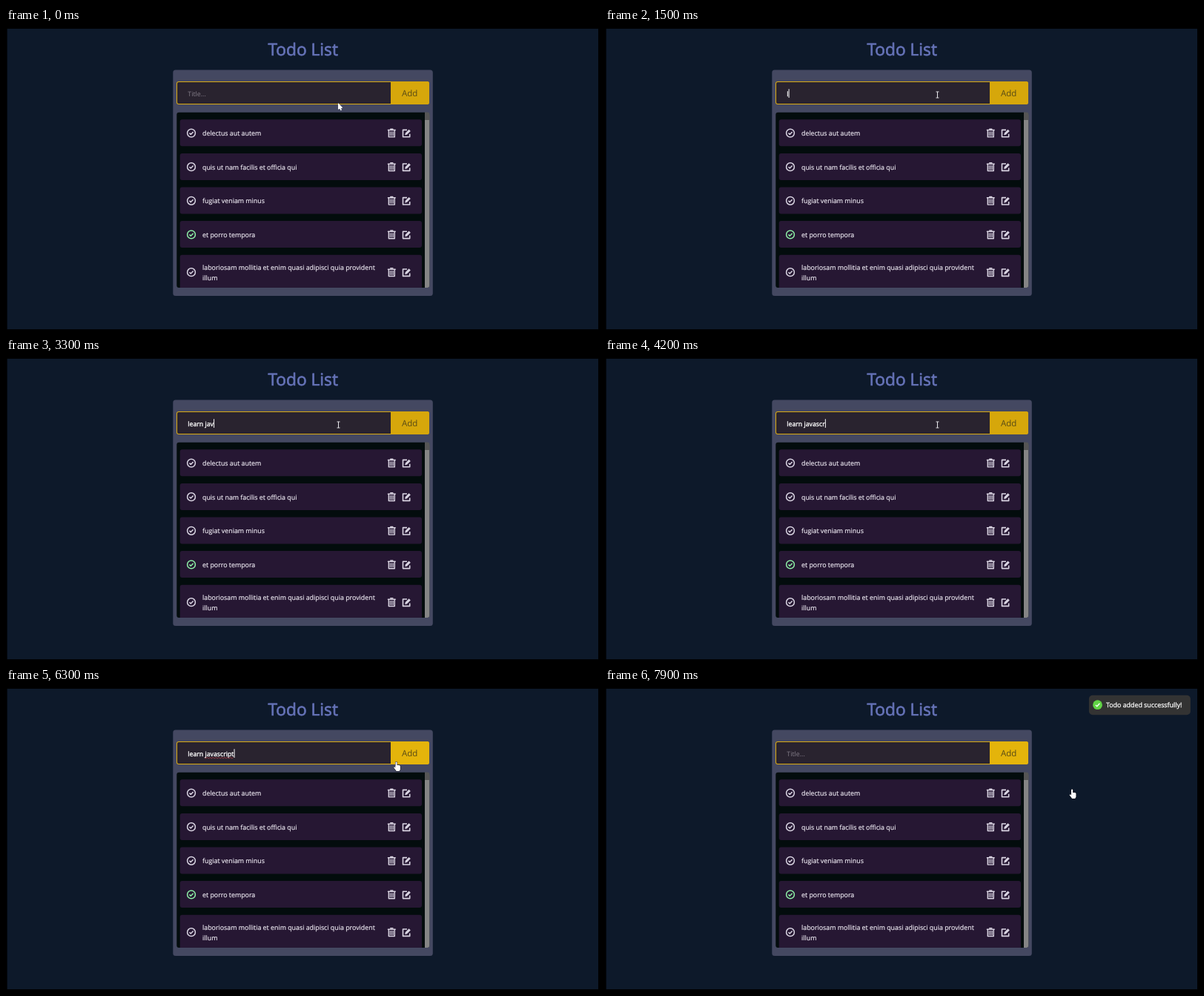
Animation, 800 px wide and 407 px high, one loop 8 s. Source, as an HTML page with a canvas:

```html
<!DOCTYPE html>
<html lang="en">
<head>
<meta charset="utf-8">
<title>Todo List</title>
<style>
html, body { margin: 0; width: 100%; height: 100%; overflow: hidden; background: #0d192a; }
canvas { display: block; width: 800px; height: 407px; }
</style>
</head>
<body>
<canvas id="stage" width="800" height="407"></canvas>
<script>
const ctx = document.getElementById('stage').getContext('2d');
const LOOP = 8000, STEP = 100;
const FONT = '"Open Sans", "Noto Sans", sans-serif';
const ICON = '#d9d4e2', WHITE = '#fafafa', BODY = 8.86;
const TYPED = 'learn javascript', TEXT_X = 245.3, TEXT_Y = 91.6;
const FOCUS = 900, FIRST_KEY = 1360, KEY_GAP = 225, BLINK = 530;
const SPELL = 5300, HOVER = 6200, CLICK = 6800, CLEAR = 7000, TOAST = 7068;
const ITEMS = [
  'delectus aut autem',
  'quis ut nam facilis et officia qui',
  'fugiat veniam minus',
  'et porro tempora',
  'laboriosam mollitia et enim quasi adipisci quia provident\nillum'
];
const DONE = 3;
const MOVES = [
  { from: 200, to: 600, dx: 0.5, dy: -11 },
  { from: 5500, to: 6200, dx: 78, dy: 9.5 },
  { from: 6300, to: 6700, dx: 8.5, dy: -6 },
  { from: 7300, to: 7900, dx: 95, dy: 43 }
];

const clamp = v => Math.max(0, Math.min(1, v));
const smooth = v => v * v * (3 - 2 * v);
const easeOut = (v, power) => 1 - (1 - clamp(v)) ** power;
const backOut = v => 1 + 2.7 * (v - 1) ** 3 + 1.7 * (v - 1) ** 2;

function box(x, y, w, h, color, r = 0) {
  ctx.fillStyle = color;
  ctx.beginPath();
  ctx.roundRect(x, y, w, h, r);
  ctx.fill();
}

// weight is the width of an outline that thickens the letters
function text(str, x, y, size, color, weight = 0.2) {
  ctx.font = `${size}px ${FONT}`;
  ctx.fillStyle = ctx.strokeStyle = color;
  ctx.fillText(str, x, y);
  if (weight) {
    ctx.lineWidth = weight;
    ctx.strokeText(str, x, y);
  }
  return ctx.measureText(str).width;
}

function line(points, color, width) {
  ctx.strokeStyle = color;
  ctx.lineWidth = width;
  ctx.beginPath();
  points.forEach(([x, y]) => ctx.lineTo(x, y));
  ctx.stroke();
}

function ring(r, color, width, from = 0, to = 2 * Math.PI) {
  ctx.strokeStyle = color;
  ctx.lineWidth = width;
  ctx.beginPath();
  ctx.arc(0, 0, r, from, to);
  ctx.stroke();
}

function placed(x, y, draw) {
  ctx.save();
  ctx.translate(x, y);
  draw();
  ctx.restore();
}

function checkIcon(color) {
  ring(5.4, color, 1.5);
  line([[-2.5, 0], [-0.7, 1.8], [2.6, -1.6]], color, 1.5);
}

function trashIcon() {
  box(-5.5, -4.8, 11, 1.5, ICON, 0.5);
  box(-2.2, -6.1, 4.4, 1.5, ICON, 0.6);
  line([[-4, -4], [-4, 5.3], [4, 5.3], [4, -4]], ICON, 1.4);
  for (let x = -2; x <= 2; x += 2) box(x - 0.55, -2.2, 1.1, 6, ICON);
}

function editIcon() {
  line([[0.5, -4.2], [-5, -4.2], [-5, 5.2], [4.2, 5.2], [4.2, 1.2]], ICON, 1.6);
  line([[-1, 1.4], [4.2, -3.8]], ICON, 3.1);
  line([[-2, 2.4], [-0.5, 0.9]], ICON, 1.6);
}

function drawItem(item, i) {
  const y = 123.3 + 45.6 * i;
  const lines = item.split('\n'), extra = lines.length - 1;
  const mid = y + 18.3 + extra * 5.2;
  box(234.7, y, 326.3, 36 + extra * 14, '#261733', 3);
  placed(250, mid, () => checkIcon(i === DONE ? '#8df0a6' : ICON));
  placed(520.3, mid, trashIcon);
  placed(540.5, mid, editIcon);
  lines.forEach((s, n) => text(s, 265, mid + 3.4 + (n - extra / 2) * 14.2, BODY, '#eae6ef'));
}

function drawInput(t) {
  box(230, 72, 341, 31, '#d9aa12', 3);
  box(231, 73, 288, 29, '#29232f', [2, 0, 0, 2]);
  box(519, 72, 52, 31, t >= HOVER ? '#e4b40b' : '#d6a70b', [0, 3, 3, 0]);
  text('Add', 534, 92.3, 11.5, '#574a16', 0);

  const keys = Math.floor((t - FIRST_KEY) / KEY_GAP) + 1;
  const count = t < CLEAR ? Math.max(0, Math.min(TYPED.length, keys)) : 0;
  if (!count) text('Title...', TEXT_X, TEXT_Y, BODY, '#837d88', 0);
  const end = TEXT_X + text(TYPED.slice(0, count), TEXT_X, TEXT_Y, 8.75, WHITE, 0.35);
  if (t >= SPELL && t < CLEAR) {
    const start = TEXT_X + ctx.measureText('learn ').width, wave = [];
    for (let x = start; x <= end; x++) wave.push([x, 94.2 + 0.6 * Math.sin((x - start) * 1.6)]);
    line(wave, '#c4444c', 0.8);
  }
  if (t >= FOCUS && t < CLICK) {
    const last = count ? FIRST_KEY + (count - 1) * KEY_GAP : FOCUS;
    if ((t - last) % (2 * BLINK) < BLINK) box(end + 0.1, 82.3, 1, 11.6, WHITE);
  }
}

function drawPage(t) {
  box(0, 0, 800, 407, '#000');
  box(1.6, 1, 797.4, 405, '#0d192a');
  text('Todo List', 353.4, 37.2, 22.7, '#6673b8', 0.7);
  box(225.3, 56.4, 350.5, 304.6, '#444861', 3.5);
  drawInput(t);
  ctx.save();
  ctx.beginPath();
  ctx.roundRect(230.3, 113.8, 341, 236.2, 3);
  ctx.clip();
  box(230, 113, 342, 238, '#030c0d');
  ITEMS.forEach(drawItem);
  box(565, 113, 7, 238, '#858585');
  box(565, 113, 7, 11, '#555');
  ctx.restore();
}

function toastIcon(age) {
  const grow = backOut(clamp((age - 100) / 300));
  if (grow < 0.9) {
    const turn = age / 1000 * 2 * Math.PI, q = Math.PI / 4;
    ring(3.25, '#e0e0e0', 1.3, turn + q, turn - q);
    ring(3.25, '#616161', 1.3, turn - q, turn + q);
  }
  if (grow <= 0) return;
  ctx.globalAlpha *= clamp(grow);
  const r = 6.4 * grow;
  box(-r, -r, 2 * r, 2 * r, '#61d345', r);
  const k = easeOut((age - 200) / 200, 2);
  const a = clamp(k / 0.4), b = clamp((k - 0.4) / 0.6);
  if (k > 0) line([[-2.7, 0.2], [-2.7 + 1.9 * a, 0.2 + 1.9 * a], [-2.7 + 1.9 * a + 3.7 * b, 0.2 + 1.9 * a - 4 * b]], '#fff', 1.3);
}

function drawToast(t) {
  const age = t - TOAST;
  if (age < 0) return;
  const p = easeOut(age / 350, 3.4), scale = 0.6 + 0.4 * p;
  placed(721.4, 23 - 52 * (1 - p), () => {
    ctx.globalAlpha = 0.5 + 0.5 * p;
    ctx.scale(scale, scale);
    box(-68.5, -13.2, 137, 26.4, '#333', 5);
    text('Todo added successfully!', -45.4, 3.1, BODY, WHITE, 0.3);
    ctx.translate(-56.9, -0.3);
    toastIcon(age);
  });
}

function arrow() {
  line([[2.4, 6], [4.2, 9.8]], '#fff', 1.7);
  ctx.beginPath();
  ctx.lineTo(0, 0);
  ctx.lineTo(0, 8.8);
  ctx.lineTo(6.2, 6.4);
  ctx.fillStyle = '#fff';
  ctx.fill();
}

function beam() {
  box(-0.5, -4, 1, 8, '#e8e8ec');
  for (const y of [-4.5, 3.6]) box(-2, y, 4, 0.9, '#e8e8ec');
}

function hand() {
  const parts = grow => {
    const color = grow ? '#15151c' : '#fff';
    const part = (x, y, w, h, r) =>
      box(x - grow, y - grow, w + 2 * grow, h + 2 * grow, color, r + grow);
    part(-1, 0, 2.1, 9, 1);
    part(-1, 4.4, 6.4, 7, 1.5);
    part(-0.4, 9, 5, 3.6, 0.8);
    line([[-2.8, 7.2], [0, 10.6]], color, 1.7 + 2 * grow);
  };
  parts(0.5);
  parts(0);
}

function drawPointer(t) {
  let x = 448, y = 101;
  for (const m of MOVES) {
    const p = smooth(clamp((t - m.from) / (m.to - m.from)));
    x += m.dx * p;
    y += m.dy * p;
  }
  placed(x, y, x > 519 ? hand : y > 99.8 ? arrow : beam);
}

function frame(now) {
  const t = Math.floor(now % LOOP / STEP) * STEP;
  ctx.textRendering = 'geometricPrecision';
  ctx.lineJoin = 'round';
  drawPage(t);
  drawToast(t);
  drawPointer(t);
}

const start = performance.now();
function tick() {
  frame(performance.now() - start);
  requestAnimationFrame(tick);
}
tick();
</script>
</body>
</html>
```
